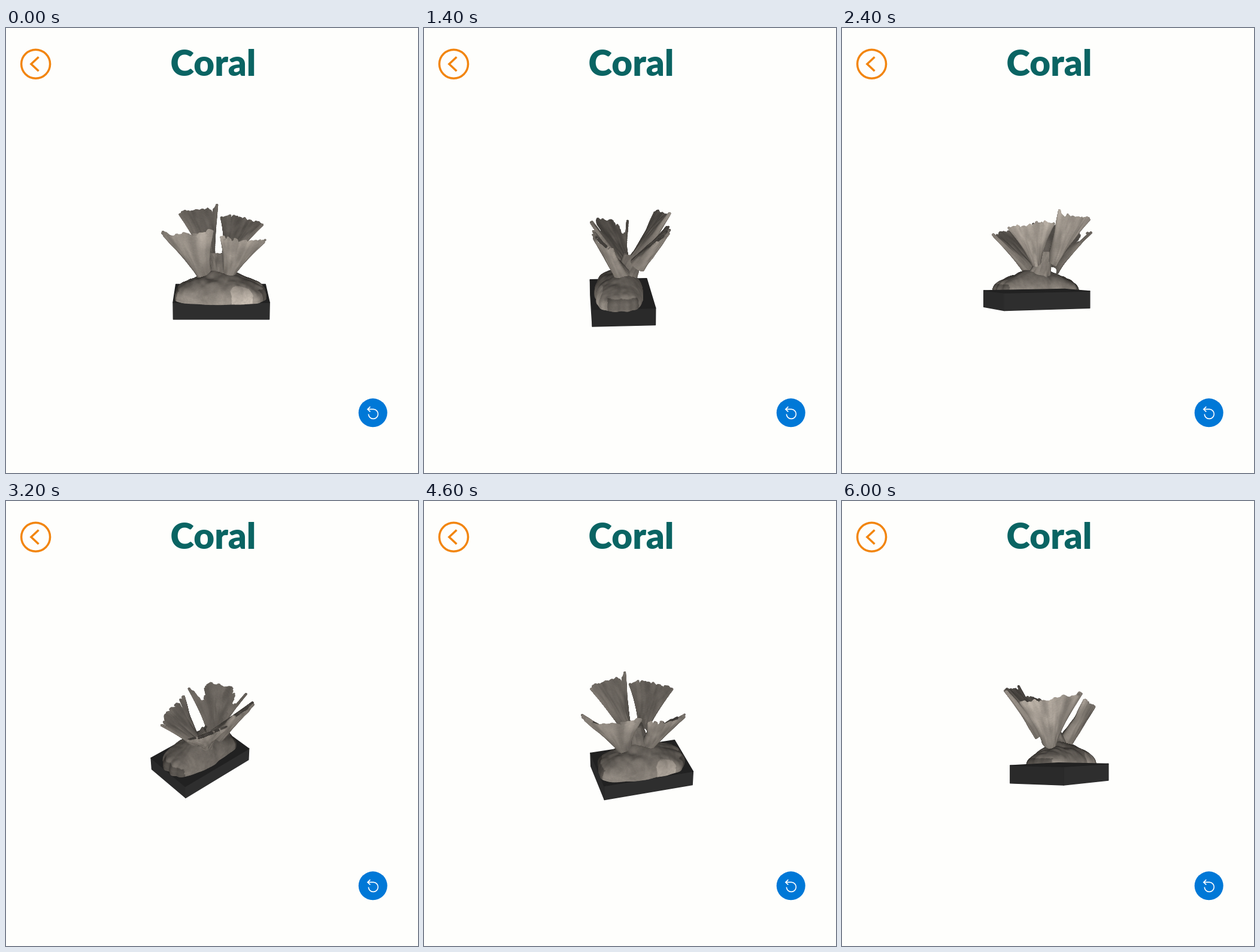
An HTML page with a canvas that plays this animation: 688x744 px, repeating every 6200 ms.

```html
<!DOCTYPE html>
<html lang="en">
<head>
<meta charset="utf-8">
<title>Coral</title>
<style>
  html, body { margin: 0; width: 100%; height: 100%; overflow: hidden; background: #fefefc; }
  canvas, svg { position: absolute; left: 0; top: 0; width: 688px; height: 744px; }
  text { font: 900 60px Lato, sans-serif; fill: #0a6463; text-anchor: middle; }
</style>
</head>
<body>
<canvas id="stage" width="688" height="744"></canvas>
<svg viewBox="0 0 688 744" fill="none">
  <g stroke="#f2850f" stroke-width="3.5">
    <circle cx="49.6" cy="60.2" r="24"/>
    <path d="M54.5 48.5 42 60.2 54.5 72"/>
  </g>
  <text x="346" y="80">Coral</text>
  <circle cx="612.7" cy="643.3" r="24" fill="#0078d7"/>
  <path d="M608.3 633.2 603.8 637.4 608.3 641.6M604 637.4H613.5A8 8 0 1 1 605.3 645.5" stroke="#fff" stroke-width="1.6"/>
</svg>
<script>
const ctx = document.getElementById("stage").getContext("2d");
const LOOP = 6200, STEP = 200, CX = 344, CY = 384, EYE = 1300, TAU = Math.PI * 2, RAD = TAU / 360;
const { sin, cos, abs, max, hypot, floor } = Math;

// the drag passes through these views
const views = [
  { at: 0, yaw: 0, pitch: 15, zoom: 1 },
  { at: 1400, yaw: -86, pitch: 16, zoom: 1 },
  { at: 2400, yaw: -156, pitch: 0, zoom: 0.98 },
  { at: 3200, yaw: -139, pitch: 40, zoom: 0.92 },
  { at: 4000, yaw: -28, pitch: 54, zoom: 0.97 },
  { at: 5200, yaw: 59, pitch: 11.5, zoom: 1 },
  { at: 6000, yaw: 59, pitch: -0.5, zoom: 1 }
];

// vectors are [x, up, z]
const add = (a, b, k = 1) => a.map((v, i) => v + b[i] * k);
const sub = (a, b) => add(a, b, -1);
const dot = (a, b) => a[0] * b[0] + a[1] * b[1] + a[2] * b[2];
const cross = (a, b) => [a[1] * b[2] - a[2] * b[1], a[2] * b[0] - a[0] * b[2], a[0] * b[1] - a[1] * b[0]];
const unit = a => { const l = hypot(...a) || 1; return a.map(v => v / l); };
const mix = (a, b, k) => a + (b - a) * k;

function hash(i, j) {
  const s = sin(i * 127.1 + j * 311.7) * 43758.5453;
  return s - floor(s);
}

function noise(x, y) {
  const i = floor(x), j = floor(y), fx = x - i, fy = y - j;
  const a = fx * fx * (3 - 2 * fx), b = fy * fy * (3 - 2 * fy);
  return mix(mix(hash(i, j), hash(i + 1, j), a), mix(hash(i, j + 1), hash(i + 1, j + 1), a), b) * 2 - 1;
}

const dots = [];

// samples a closed surface as small discs with outward normals
function surface(at, core, tone, nu, nv) {
  const e = 0.005;
  for (let i = 0; i < nu; i++) for (let j = 0; j <= nv; j++) {
    const u = i / nu, v = j / nv, p = at(u, v);
    let n = unit(cross(sub(at(u + e, v), at(u - e, v)), sub(at(u, v + e), at(u, v - e))));
    if (dot(n, sub(p, core(v))) < 0) n = n.map(c => -c);
    dots.push({ p, n, tone: tone(u, v, p) * (1 + 0.06 * (hash(i, j) - 0.5)) });
  }
}

// every fan grows from the trunk to its own arc of one oval rim
function fan(angle, span, high) {
  const rim = s => {
    const a = (angle + s * span) * RAD;
    return [10 + 92 * sin(a), high - 15 * abs(sin(a)), 62 * cos(a)];
  };
  const a = angle * RAD;
  const foot = [10 + 34 * sin(a), -14 - 10 * cos(a), 2 + 14 * cos(a)];
  const mid = rim(0), stem = sub(mid, foot);
  const normal = unit(cross(sub(rim(1), rim(-1)), stem));
  const spine = v => add(foot, stem, v);
  const at = (u, v) => {
    const s = cos(u * TAU), k = max(v, 0);
    const ragged = 0.05 * noise(s * 3 + angle, 1) + 0.035 * noise(s * 12, angle);
    const len = v * (1 + ragged * v * v);
    const wide = 0.19 + 0.81 * k ** 1.25;
    const thick = 2.5 + 9 * max(1 - v, 0);
    const p = add(spine(len), sub(rim(s), mid), wide);
    return add(p, normal, thick * sin(u * TAU) + 0.8 * noise(s * 5 + angle, v * 5));
  };
  const tone = (u, v) => {
    const s = cos(u * TAU);
    return mix(0.92, 1, v) + 0.07 * noise(s * 11 + angle, v * 2) + 0.08 * noise(s * 4, v * 5 + angle);
  };
  surface(at, spine, tone, 180, 56);
}

function trunk() {
  const core = v => [mix(17, 9, v), mix(-48, 8, v), mix(13, -3, v)];
  const at = (u, v) => {
    const r = mix(20, 12, v) + 2 * noise(3 * cos(u * TAU) + 7, 3 * sin(u * TAU) + v * 4);
    return add(core(v), [r * cos(u * TAU), 0, r * sin(u * TAU)]);
  };
  surface(at, core, (u, v) => 0.95 + 0.1 * noise(5 * cos(u * TAU), v * 5), 90, 44);
}

function rock() {
  const at = (u, v) => {
    const c = cos(u * TAU), s = sin(u * TAU);
    const square = (abs(c) ** 3 + abs(s) ** 3) ** (-1 / 3);
    const r = sin(v * TAU / 4) * square * (1 + 0.06 * noise(c * 4 + 9, s * 4));
    const x = 13 + 72 * r * c, z = 20 + 37 * r * s;
    const hump = 14 * Math.exp(-((x - 14) ** 2 + (z - 8) ** 2) / 900);
    const high = 30 + hump + 4 * noise(x / 19, z / 15) + noise(x / 7, z / 7);
    return [x, -62 + high * max(cos(v * TAU / 4), 0) ** 0.65, z];
  };
  const tone = (u, v, [x, y, z]) => {
    const chip = hypot((x - 48) / 18, (z - 54) / 8) < 1 ? 1.25 : 1;
    const hollow = abs(x - 13) > 60 && y < -46 && z < 40 ? 0.7 : 1;
    return chip * hollow * (1.06 + 0.07 * noise(x / 14, z / 8) + 0.05 * noise(x / 4, y / 4));
  };
  surface(at, () => [13, -80, 20], tone, 260, 64);
}

rock();
trunk();
fan(-158, 22, 72);
fan(150, 25, 61);
fan(-48, 43, 60);
fan(30, 27, 51);

function pose(t) {
  const i = max(1, views.findIndex(v => v.at >= t));
  const a = views[i - 1], b = views[i], k = (t - a.at) / (b.at - a.at);
  return { yaw: mix(a.yaw, b.yaw, k) * RAD, pitch: mix(a.pitch, b.pitch, k) * RAD, zoom: mix(a.zoom, b.zoom, k) };
}

function camera({ yaw, pitch, zoom }) {
  const cy = cos(yaw), sy = sin(yaw), cp = cos(pitch), sp = sin(pitch);
  const turn = ([x, y, z]) => {
    const d = z * cy - x * sy;
    return [x * cy + z * sy, y * cp - d * sp, d * cp + y * sp];
  };
  const place = p => {
    const [x, y, f] = turn(p), k = zoom * EYE / (EYE - f);
    return [CX + x * k, CY - y * k, f];
  };
  return { turn, place };
}

function drawFace(points, gray) {
  const [a, b, c] = points;
  if ((b[0] - a[0]) * (c[1] - a[1]) >= (b[1] - a[1]) * (c[0] - a[0])) return;
  ctx.fillStyle = ctx.strokeStyle = `rgb(${gray},${gray},${gray})`;
  ctx.lineJoin = "round";
  ctx.lineWidth = 1.5;
  ctx.beginPath();
  points.forEach(([x, y]) => ctx.lineTo(x, y));
  ctx.closePath();
  ctx.fill();
  ctx.stroke();
}

function drawBase({ place }) {
  // corners run round the block a quarter turn at a time
  const ring = up => [0, 1, 2, 3].map(i => {
    const a = (i - 0.5) * TAU / 4;
    return place([15 + 77.5 * Math.sign(sin(a)), up, 16 + 50 * Math.sign(cos(a))]);
  });
  const top = ring(-57), low = ring(-85.5);
  for (let i = 0; i < 4; i++) {
    const j = (i + 1) % 4;
    drawFace([low[i], low[j], top[j], top[i]], i % 2 ? 42 : 46);
  }
  drawFace(top, 33);
}

function drawCoral({ turn, place }) {
  const seen = [];
  for (const { p, n, tone } of dots) {
    const face = turn(n)[2];
    if (face < -0.15) continue;
    const [x, y, f] = place(p);
    const light = (0.6 + 0.38 * max(face, 0) - 0.28 * n[1]) * (1 + f * 0.002) * tone;
    seen.push([f, x, y, light]);
  }
  seen.sort((a, b) => a[0] - b[0]);
  for (const [, x, y, light] of seen) {
    ctx.fillStyle = `rgb(${139 * light | 0},${132 * light | 0},${124 * light | 0})`;
    ctx.beginPath();
    ctx.arc(x, y, 1.9, 0, TAU);
    ctx.fill();
  }
}

let last = -1;
function tick(now) {
  const t = floor(now % LOOP / STEP) * STEP;
  if (t !== last) {
    last = t;
    const view = pose(t), cam = camera(view);
    const parts = [drawBase, drawCoral];
    if (view.pitch < 2 * RAD) parts.reverse();
    ctx.clearRect(0, 0, 688, 744);
    parts.forEach(draw => draw(cam));
  }
  requestAnimationFrame(tick);
}
tick(0);
</script>
</body>
</html>
```
